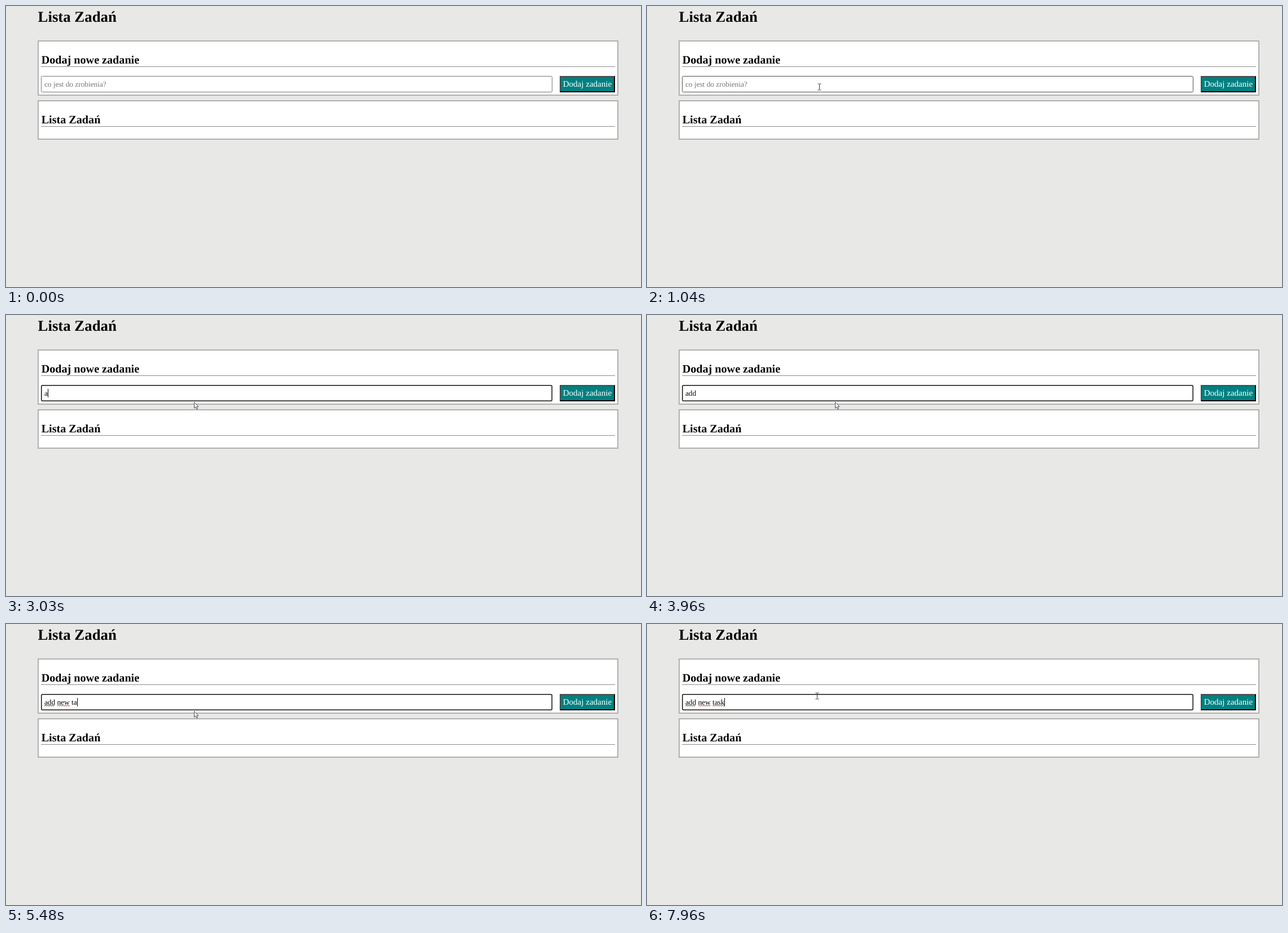
These frames come from a looping animation (1125x498 px, 8 s). An HTML page:

```html
<!DOCTYPE html>
<html lang="pl">
<head>
<meta charset="utf-8">
<title>Lista Zadań</title>
<style>
  html, body { margin: 0; width: 100%; height: 100%; overflow: hidden; background: #e8e8e6; }
  svg { display: block; width: 100vw; height: 100vh; }
  text { font-family: "Liberation Serif", "Times New Roman", serif; white-space: pre; text-rendering: geometricPrecision; }
  .h1 { font-size: 26.8px; font-weight: bold; }
  .h2 { font-size: 20.15px; font-weight: bold; }
  .field { font-size: 13.333px; }
  .panel { fill: #fff; stroke: #b0b0b0; stroke-width: 2; }
  .rule { fill: #8a8a8a; }
  .wave { fill: none; stroke-width: 1; }
</style>
</head>
<body>
<svg viewBox="0 0 1125 498">
  <rect width="1125" height="498" fill="#e8e8e6"/>
  <text class="h1" x="56.6" y="28">Lista Zadań</text>

  <rect class="panel" x="57" y="62" width="1027" height="96"/>
  <text class="h2" x="62.7" y="102">Dodaj nowe zadanie</text>
  <rect class="rule" x="62" y="107" width="1017" height="1"/>
  <rect id="box" fill="#fff"/>
  <text class="field" id="hint" x="67.89" y="143" fill="#757575">co jest do zrobienia?</text>
  <g id="waves"></g>
  <text class="field" id="typed" x="67.89" y="143"></text>
  <rect id="caret" y="131" width="1" height="15"/>

  <rect x="981" y="124" width="98" height="29" fill="#000"/>
  <path d="M981 153V124H1079L1077 126H983V151Z" fill="#4c4c4c"/>
  <rect x="983" y="126" width="94" height="25" fill="#008080"/>
  <text x="986.7" y="143" font-size="15.05" fill="#fff">Dodaj zadanie</text>

  <rect class="panel" x="57" y="168" width="1027" height="68"/>
  <text class="h2" x="62.7" y="208">Lista Zadań</text>
  <rect class="rule" x="62" y="213" width="1017" height="1"/>

  <path id="arrow" d="M.5 .5V11.2L3 8.9L4.8 12.8L6.5 12L4.8 8.3H8Z" fill="#fff" stroke="#222" stroke-width=".8"/>
  <path id="beam" d="M-3 -5.5H-.8L0 -4.8L.8 -5.5H3M0 -4.8V4.8M-3 5.5H-.8L0 4.8L.8 5.5H3" fill="none" stroke="#333" stroke-width="1"/>
</svg>
<script>
const LOOP = 8000, BLINK = 530, FOCUS = 1150, ORIGIN = 67.89;
const $ = id => document.getElementById(id);

// Each edit restarts the caret blink.
const edits = [
  [1110, ''], [3030, 'a'], [3300, 'ad'], [3430, 'add'], [4090, 'add '],
  [4290, 'add n'], [4420, 'add ne'], [4550, 'add new'], [5010, 'add new '],
  [5280, 'add new t'], [5480, 'add new ta'], [5810, 'add new tak'],
  [6270, 'add new ta'], [6410, 'add new tas'], [6540, 'add new task'],
  [6610, 'add new task']
];

// Pointer stops after the long sweep: time, x, y, shape.
const stops = [
  [900, 308, 148, 'beam'], [970, 305, 145, 'beam'], [1040, 305, 143, 'beam'],
  [1240, 309, 145, 'beam'], [1310, 322, 149, 'beam'], [1380, 333, 154, 'arrow'],
  [7540, 330, 152, 'beam'], [7610, 322, 145, 'beam'], [7740, 311, 136, 'beam'],
  [7850, 304, 130, 'beam'], [7960, 301, 127, 'beam']
];

// Spelling marks: time, left, right, colour.
const marks = [[4090, 68, 87, '#333'], [5080, 91, 113, '#e02020'], [7670, 116, 138, '#e02020']]
  .map(([start, left, right, color]) => {
    const path = document.createElementNS('http://www.w3.org/2000/svg', 'path');
    let d = `M${left} 145.5`;
    for (let x = left + 2, up = true; x <= right; x += 2, up = !up) d += `L${x} ${up ? 144 : 145.5}`;
    path.setAttribute('d', d);
    path.setAttribute('class', 'wave');
    path.setAttribute('stroke', color);
    $('waves').append(path);
    return { start, path };
  });

const latest = (list, t) => list.filter(item => item[0] <= t).pop();
const show = (el, on) => el.setAttribute('visibility', on ? 'visible' : 'hidden');

function setAttrs(el, attrs) {
  for (const key in attrs) el.setAttribute(key, attrs[key]);
}

function pointerAt(t) {
  if (t < 70) return null;
  if (t >= 900) return latest(stops, t).slice(1);
  const p = Math.min(1, Math.floor((t - 70) / 69) / 11);
  const left = (1 - p) ** 1.8;
  return [Math.round(311 + 723 * left), Math.round(152 + 334 * left), 'arrow'];
}

function drawPointer(t) {
  const pointer = pointerAt(t);
  for (const shape of ['arrow', 'beam']) {
    const on = pointer !== null && pointer[2] === shape;
    show($(shape), on);
    if (on) {
      const shift = shape === 'beam' ? 0.5 : 0;
      $(shape).setAttribute('transform', `translate(${pointer[0] + shift} ${pointer[1] + shift})`);
    }
  }
  return pointer;
}

function drawField(t, pointer) {
  const focused = t >= FOCUS;
  const line = focused ? 1.5 : 1;
  const hovered = pointer !== null && pointer[2] === 'beam';
  setAttrs($('box'), {
    x: 62 + line / 2, y: 124 + line / 2, width: 906 - line, height: 29 - line, rx: 2,
    stroke: focused ? '#101010' : hovered ? '#4f4f4f' : '#767676', 'stroke-width': line
  });

  const [since, value] = latest(edits, t) || [0, ''];
  $('typed').textContent = value;
  show($('hint'), !value);
  const width = value ? $('typed').getComputedTextLength() : 0;
  $('caret').setAttribute('x', Math.round(ORIGIN + width));
  show($('caret'), focused && Math.floor((t - since) / BLINK) % 2 === 0);
  for (const mark of marks) show(mark.path, t >= mark.start);
}

function render(t) {
  drawField(t, drawPointer(t));
}

const begin = performance.now();
function tick() {
  render((performance.now() - begin) % LOOP);
  requestAnimationFrame(tick);
}
render(0);
requestAnimationFrame(tick);
</script>
</body>
</html>
```
